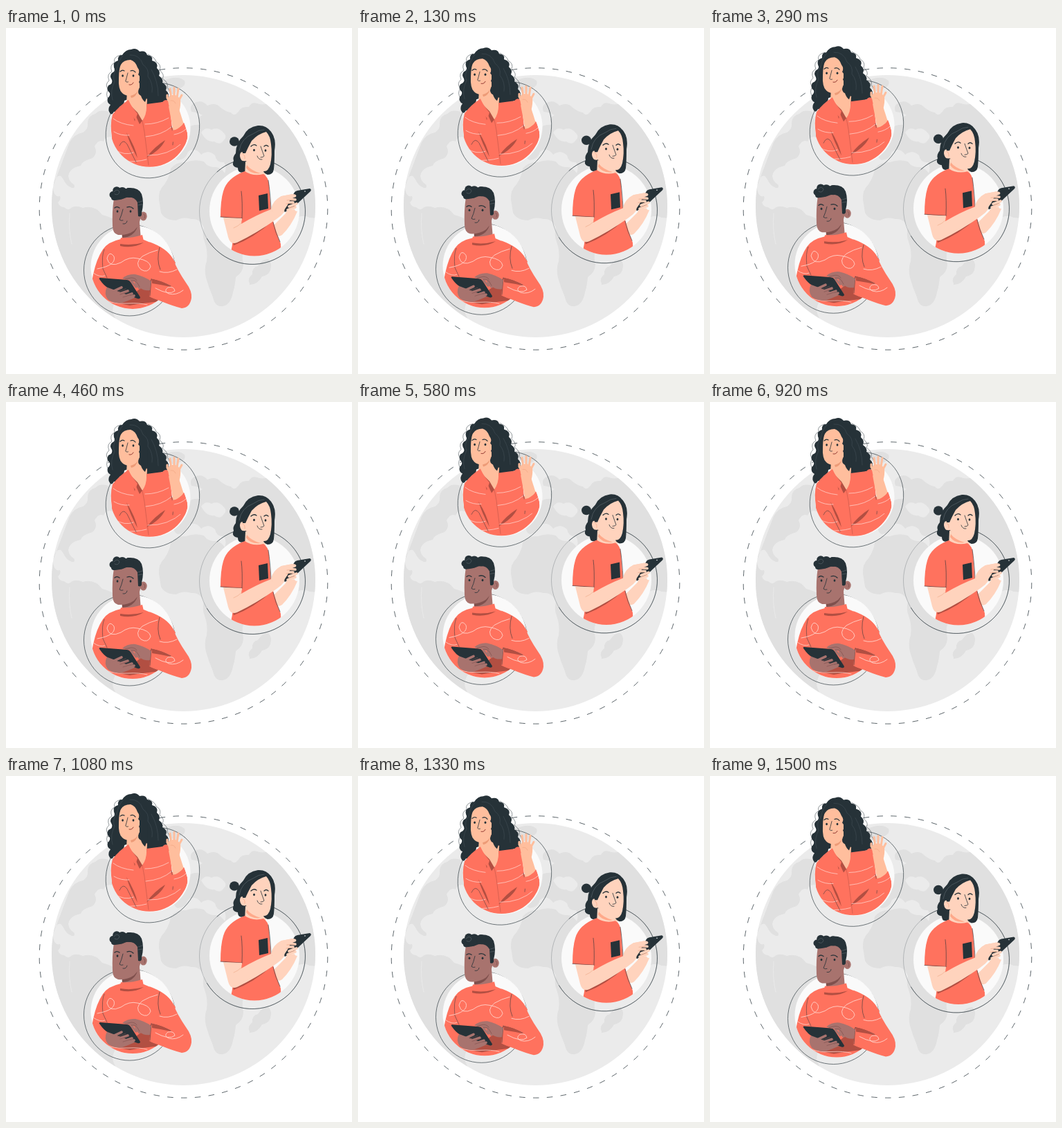
Animation of 500 by 500 pixels, one loop 1.54 s. Source, as an HTML page with a canvas:

```html
<!DOCTYPE html>
<html lang="en">
<head>
<meta charset="utf-8">
<title>Connected people</title>
<style>
html, body { margin: 0; width: 100%; height: 100%; overflow: hidden; background: #fff; }
canvas { display: block; width: 100vw; height: 100vh; }
</style>
</head>
<body>
<canvas id="stage"></canvas>
<script>
const canvas = document.getElementById('stage');
const ctx = canvas.getContext('2d');

const LOOP = 1540, LOW_POINT = 1500, LIFT = 10;
const CORAL = '#ff725e', SHADE = '#b24f42', DARK = '#263238', SHEEN = '#46535a';
const LAND = '#e0e0e0', SEA = '#ebebeb', INNER = '#fafafa';
const PEACH = '#ffbe9d', PALE = '#ffd3bd', BROWN = '#a8736e', BROWN_SHADE = '#7f504d';

const paths = new Map();
function path(d) {
  if (!paths.has(d)) paths.set(d, new Path2D(d));
  return paths.get(d);
}
function fill(color, d) {
  ctx.fillStyle = color;
  ctx.fill(path(d));
}
function line(color, width, d) {
  ctx.strokeStyle = color;
  ctx.lineWidth = width;
  ctx.stroke(path(d));
}
function oval(color, x, y, rx, ry = rx, angle = 0) {
  ctx.beginPath();
  ctx.ellipse(x, y, rx, ry, angle, 0, Math.PI * 2);
  ctx.fillStyle = color;
  ctx.fill();
}
function ring(color, width, x, y, rx, ry = rx, angle = 0, from = 0, to = Math.PI * 2) {
  ctx.beginPath();
  ctx.ellipse(x, y, rx, ry, angle, from, to);
  ctx.strokeStyle = color;
  ctx.lineWidth = width;
  ctx.stroke();
}
// Keeps a figure inside its disc below the centre, free above it.
function insideDisc([x, y, r], draw) {
  ctx.save();
  ctx.beginPath();
  ctx.rect(x - 100, 0, 200, y);
  ctx.arc(x, y, r, 0, Math.PI);
  ctx.clip();
  draw();
  ctx.restore();
}
const eyes = (...spots) => spots.forEach(([x, y]) => oval(DARK, x, y, 1.4, 1.8));

function globe() {
  ctx.save();
  oval(SEA, 256.5, 257.5, 190.5, 189.5);
  ctx.clip();
  // Americas
  fill(LAND, 'M60 250 L92 165 Q99 153 111 151 Q119 146 118 138 Q118 127 129 124 Q136 117 148 121 L160 160 Q145 153 141 164 Q134 160 128 171 Q133 181 125 188 Q110 192 108 199 Q92 202 90 214 Q91 222 98 226 Q101 232 95 231 Q87 228 83 219 Q78 209 72 217 Q66 226 69 237 Q72 245 78 243 Q80 248 75 252 Q77 259 84 259 Q89 264 93 261 Q99 255 111 260 Q128 255 139 270 Q164 276 190 303 Q193 330 176 350 Q170 377 157 397 Q151 408 158 419 L140 440 L40 380Z');
  line('#ebebeb', 0.8, 'M92 268 Q90 292 95 312');
  // Greenland and islands
  fill(LAND, 'M182 92 Q203 75 231 75 Q248 68 258 76 Q261 84 249 88 Q242 94 244 106 Q237 121 219 122 Q199 116 182 92Z');
  // Europe and Asia
  fill(LAND, 'M244 167 Q243 157 253 155 Q263 152 264 144 Q270 139 280 140 Q275 129 284 126 Q278 122 268 121 Q264 111 275 107 Q284 104 291 112 Q303 107 309 114 Q317 121 325 122 Q329 129 336 121 Q339 113 351 114 Q355 106 363 109 Q372 112 377 109 Q376 102 386 106 Q414 132 430 160 Q444 185 449 215 L462 270 Q444 278 434 272 Q418 270 414 285 Q405 307 395 286 Q386 271 371 271 L338 244 Q326 226 313 215 Q321 204 315 194 Q304 195 302 184 Q293 175 282 183 Q273 171 263 179 Q260 190 248 191 Q240 187 245 178Z');
  fill(SEA, 'M282 151 Q288 142 297 147 Q306 142 314 151 Q321 157 314 163 Q309 170 301 164 Q290 166 282 151Z');
  // Africa
  fill(LAND, 'M221 248 Q220 234 229 226 Q237 214 238 203 Q246 193 260 194 Q273 189 286 193 Q292 202 303 201 Q315 202 321 221 Q332 240 340 264 Q355 267 367 275 Q363 297 347 313 Q339 324 343 341 Q343 353 332 360 Q331 373 328 382 Q325 399 314 402 Q302 404 299 389 Q293 375 289 361 Q286 348 290 337 Q292 322 287 309 Q283 299 286 289 Q281 275 268 276 Q256 272 246 278 Q230 278 224 267Z');
  fill(LAND, 'M352 369 Q348 362 356 356 Q355 346 364 344 Q371 333 379 334 Q385 339 382 350 Q379 358 370 359 Q364 371 352 371Z');
  ctx.restore();

  ctx.save();
  ctx.lineCap = 'butt';
  ctx.setLineDash([8.6, 11.3]);
  ring(DARK, 0.75, 256.5, 261.4, 208.3, 203.7);
  ctx.restore();
}

function wavingWoman() {
  ring(DARK, 0.65, 212, 148, 71.5, 65, -0.87);
  oval(INNER, 209, 144, 57.5);
  // Hair with a loose outline
  line(DARK, 0.5, 'M166 39 Q154 42 157 50 Q149 54 153 63 Q145 67 149 76 Q142 82 148 89 Q143 96 148 103');
  line(DARK, 0.5, 'M205 38 Q216 43 217 49 Q225 53 222 61 Q230 68 226 73 Q235 79 233 86 Q240 94 236 101');
  fill(DARK, 'M181 31 Q188 28 193 34 Q202 32 204 39 Q213 40 211 47 Q221 50 218 58 Q224 63 221 69 Q228 74 226 79 Q234 83 231 90 Q237 95 234 102 Q232 108 225 107 Q219 114 211 112 L201 117 L182 101 L171 105 Q171 112 164 114 Q163 122 156 121 Q152 128 149 121 Q147 116 151 111 Q145 108 147 101 Q151 98 150 94 Q144 89 148 83 Q155 80 153 75 Q149 69 153 65 Q159 62 156 57 Q154 49 162 47 Q161 39 168 39 Q173 31 181 31Z');

  insideDisc([207.5, 144, 56.8], () => {
    fill(PEACH, 'M175 92 L193 87 L204 103 L203 124 L197 135 L183 124 L174 108Z');
    fill(CORAL, 'M177 104 Q164 112 154 125 Q150 138 153 157 L150 207 L266 207 L262 154 Q260 143 257 137 L240 144 L236 107 Q231 101 226 107 L203 110 Q204 124 197 134 Q184 122 177 104Z');
    fill(SHADE, 'M180 112 L190 122 L197 134 L193 139 L188 128 L186 135Z');
    fill(CORAL, 'M176 104 L183 115 L190 124 L187 133 Q178 122 173 110Z');
    fill(SHADE, 'M174 151 Q179 168 190 188 Q187 172 174 151Z');
    fill(SHADE, 'M203 187 Q214 172 230 162 Q224 176 203 187Z');
    line(SHADE, 0.5, 'M197 134 L200 150 L206 198');
    line('#ffd0c8', 0.8, 'M155 131 Q165 139 184 141 M156 150 Q166 156 178 155 M158 176 Q171 185 184 180 M201 139 Q219 139 235 130 M202 157 Q225 155 239 143 M205 184 Q234 185 255 166 M169 193 Q188 194 203 190');
    line(DARK, 0.5, 'M164 170 Q169 159 175 168 L188 194 M239 142 Q243 157 241 169');
    fill(PEACH, 'M235 113 L250 117 L257 139 L242 150Z');
    fill(CORAL, 'M240 148 Q251 147 257 137 L262 152 L260 171 L240 164Z');
    line('#ffd0c8', 0.8, 'M243 154 Q254 152 260 146');
  });

  fill(PEACH, 'M168 46 Q163 58 163 72 Q162 89 168 94 Q176 101 185 95 L193 87 L193 58 L187 46 L177 42Z');
  fill('#ed9b77', 'M180 98 Q188 96 191 90 Q188 100 181 101Z');
  fill(DARK, 'M163 58 Q162 40 178 36 Q195 33 203 51 L205 96 L201 107 Q197 104 195 98 Q189 95 192 88 Q195 83 192 78 Q196 72 191 67 Q194 62 190 57 Q187 48 180 46 Q170 46 166 53Z');
  line(SHEEN, 0.5, 'M179 39 Q193 38 198 53 Q207 59 205 70 Q213 80 211 93 M169 40 Q162 48 160 59 Q153 69 157 78 Q150 90 154 104 M210 60 Q220 77 220 98');
  eyes([168.6, 69], [184, 69]);
  line(DARK, 1.2, 'M165 63 Q168 60 171 62 M180 62 Q184 60 187 64');
  line(DARK, 0.8, 'M176 65 Q174 73 172.8 77 Q174 79 176.5 78');
  line('#8f342d', 1, 'M178 82 Q182 83 184 79');

  // Raised hand
  fill(PEACH, 'M234 101 Q237 96 245 97 L252 102 Q253 112 250 121 L238 119 Q234 111 234 101Z');
  line(PEACH, 3, 'M237 108 L233 101 L233 97 M239 101 L237 88 M243 100 L243 86 M247 101 L249 88 M249 106 L254 97');
  line('#eb9c78', 0.5, 'M238 105 Q243 104 245 109');
}

function texter() {
  // The outline thins out on the left.
  ring(DARK, 0.25, 356, 265, 76.5);
  ring(DARK, 0.65, 356, 265, 76.5, 76.5, 0, -2.3, 2.6);
  const disc = [359, 264.5, 65];
  oval(INNER, ...disc);
  oval(DARK, 330, 164, 7, 6.7);
  fill(DARK, 'M344 208 Q335 211 335 202 Q325 200 329 192 Q327 187 332 181 Q332 166 343 156 Q349 143 364 141 Q376 140 383 150 Q391 160 388 176 L380 200 L360 205Z');

  insideDisc(disc, () => {
    fill(PALE, 'M346 193 L345 215 L360 222 L375 214 L377 199Z');
    fill(PALE, 'M386 286 L410 262 L421 265 Q413 285 399 299 Q394 303 389 298Z');
    fill(CORAL, 'M345 207 Q357 215 372 211 Q379 215 380 226 L383 265 Q386 284 397 312 L398 334 L322 334 Q330 309 327 293 L341 277 L310 273 Q310 249 314 236 Q319 217 345 207Z');
    fill(SHADE, 'M327 303 L386 269 L386 278 Q359 303 329 314Z');
    line(DARK, 0.6, 'M341 275 Q342 251 340 236 M310 273 L341 275 M379 220 Q382 239 383 262 M386 281 Q389 295 396 309');
    fill(DARK, 'M365 242 L378 239 L379 261 L366 264Z');
  });

  fill(PALE, 'M314 274 L341 275 L340 283 Q362 270 383 262 Q385 250 398 243 L414 240 L419 244 L408 252 Q406 266 391 276 Q363 296 334 310 Q324 314 321 302Z');
  line('#eda887', 0.6, 'M341 281 Q335 287 329 289 M385 264 Q389 263 391 260');
  fill(PALE, 'M350 163 Q347 172 346 181 Q338 176 338 185 Q339 194 347 192 Q349 203 359 207 Q371 214 379 205 Q385 192 385 174 L381 149 L368 148Z');
  line('#f4a986', 0.7, 'M342 182 Q346 184 345 189');
  fill('#ffa98a', 'M348 198 Q354 206 368 210 Q354 212 347 202Z');
  fill(DARK, 'M342 181 Q340 163 350 152 Q366 138 382 149 Q390 158 388 178 Q388 194 387 204 Q386 212 378 212 Q373 210 372 207 Q379 208 382 197 Q385 183 383 168 Q382 156 376 150 Q364 153 355 163 Q350 172 346 181Z');
  line('#6b757a', 0.5, 'M337 177 Q340 159 357 153 Q365 147 373 147');
  eyes([358.5, 176.5], [375, 177]);
  line(DARK, 1.3, 'M354 171 Q358 167 362 170 M373 171 Q376 168 379 171');
  line(DARK, 0.8, 'M368 171 Q371 180 373 185 Q372 187 368 187 M363 185 Q365 191 370 190');

  // Phone and fingers
  fill(DARK, 'M416 239 Q417 236 421 235 L439 232 Q442 233 440 236 L425 250 Q418 258 403 266 Q401 264 404 260Z');
  oval('#fff', 432, 236, 0.8);
  fill(PALE, 'M383 262 Q386 249 398 243 L414 240 Q421 240 419 244 L409 248 Q409 257 400 263 L389 270Z');
  line(PALE, 3.6, 'M405 247 L418 248 M404 252 L415 252 M409 258 L420 254 M407 263 L418 259 M406 267 L416 264');
  line('#e9a281', 0.6, 'M406 249 L417 248 M405 254 L414 253 M410 260 L418 257');
}

function tabletReader() {
  ring(DARK, 0.65, 178.5, 350, 66);
  const disc = [183, 345.5, 60.5];
  oval(INNER, ...disc);
  insideDisc(disc, () => {
    fill(CORAL, 'M166 305 Q147 309 140 320 Q131 333 126 356 Q122 372 127 390 L127 410 L238 410 L233 365 L245 339 Q232 319 199 306Z');
    fill(SHADE, 'M187 382 L211 363 L209 389 Q223 396 235 394 Q200 397 179 401 L158 397 Q181 394 187 382Z');
    line('#ffd4cb', 0.8, 'M126 354 Q136 361 143 358 M132 388 Q151 400 176 398 Q193 397 204 400');
    line(DARK, 0.5, 'M142 320 Q138 329 140 348 L146 361');
  });

  fill(CORAL, 'M207 309 Q232 318 241 333 Q247 349 260 368 Q269 380 268 390 Q266 404 254 405 Q242 402 227 396 L207 388 L210 363 L224 365 Q216 348 219 327Z');
  line(DARK, 0.55, 'M222 317 Q217 335 223 349 M210 363 L208 387 M210 363 Q225 366 238 373');
  fill(SHADE, 'M211 363 Q226 365 238 374 Q225 371 211 369Z');
  line('#ffd4cb', 0.9, 'M132 348 Q160 343 156 330 Q149 321 146 333 Q149 347 166 339 Q178 330 190 333 Q208 336 209 345 Q205 355 195 349 Q185 340 197 330 Q207 324 219 321 M222 352 Q234 356 247 349 M216 376 Q236 387 244 380 Q243 373 234 375 Q227 380 235 384 Q246 387 256 379');

  // Neck and collar
  fill(BROWN, 'M167 291 L192 270 L195 305 Q180 311 168 305Z');
  fill(BROWN_SHADE, 'M168 298 Q180 297 190 287 Q185 302 168 303Z');
  fill(CORAL, 'M166 303 Q181 304 197 299 L200 312 Q184 318 164 313Z');
  fill(SHADE, 'M165 312 Q181 315 199 310 Q184 319 165 315Z');

  // Head
  oval(BROWN, 198.5, 272, 5.2, 6.5);
  fill(BROWN, 'M156 246 Q153 265 154 286 Q154 297 162 299 Q175 300 185 293 Q195 284 195 267 L193 243 L175 241Z');
  fill(DARK, 'M155 249 L158 240 L176 231 Q192 230 196 240 Q200 252 196 267 Q197 274 191 272 L190 252 Q185 243 174 245 Q165 249 155 249Z');
  for (const [x, y, r] of [[154.5, 241, 5], [160, 235, 5.8], [156, 245, 4], [168, 237, 7], [166, 242, 5.5], [178, 238, 7]])
    oval(DARK, x, y, r);
  line('#6b757a', 0.5, 'M156 237 Q161 231 164 237 Q162 243 157 240 M191 252 L197 250 M191 256 L197 255');
  line(BROWN_SHADE, 0.8, 'M199 269 Q202 270 200 275');
  eyes([161, 265], [180, 265]);
  line(DARK, 1.3, 'M157 260 Q160 257 164 260 M175 259 Q180 257 184 261');
  line(DARK, 0.8, 'M169 262 Q167 271 164 277 Q166 279 169 278 M169 283 Q174 284 175 279');

  // Tablet held in both hands
  fill(BROWN, 'M146 374 Q141 384 147 392 Q155 399 168 397 Q177 394 188 389 L183 382 L164 370Z');
  fill(DARK, 'M136 361 L175 364 Q178 364 180 367 L194 389 Q194 392 190 391 L147 375 Q142 373 135 363 Q134 361 136 361Z');
  line(BROWN, 3.6, 'M152 382 L167 375 M158 386 L176 380 M164 390 L182 384 M168 393 L185 387');
  line(BROWN_SHADE, 0.6, 'M162 381 L173 377 M165 385 L178 381 M169 389 L182 385');
  fill(BROWN, 'M168 362 Q176 355 187 356 Q200 359 210 366 L208 379 Q199 380 193 375 Q188 372 185 366 L171 363Z');
  line(BROWN, 3.2, 'M182 361 L172 361 M187 364 L181 366 L188 374 M193 367 L188 370 L193 376');
  line(BROWN_SHADE, 0.65, 'M172 363 L181 361 Q187 361 189 365 M181 365 L186 365 Q190 367 193 374');
}

function render(now) {
  const ratio = devicePixelRatio || 1;
  const width = Math.round(innerWidth * ratio), height = Math.round(innerHeight * ratio);
  if (canvas.width !== width || canvas.height !== height) {
    canvas.width = width;
    canvas.height = height;
  }
  ctx.setTransform(width / 500, 0, 0, height / 500, 0, 0);
  ctx.clearRect(0, 0, 500, 500);
  ctx.lineCap = ctx.lineJoin = 'round';
  globe();

  const phase = ((now - LOW_POINT) % LOOP + LOOP) % LOOP / LOOP;
  const rise = LIFT * (1 - Math.abs(2 * phase - 1));
  ctx.translate(0, 0.5 - rise);
  wavingWoman();
  texter();
  tabletReader();
}

const start = performance.now();
function tick() {
  render(performance.now() - start);
  requestAnimationFrame(tick);
}
tick();
</script>
</body>
</html>
```
